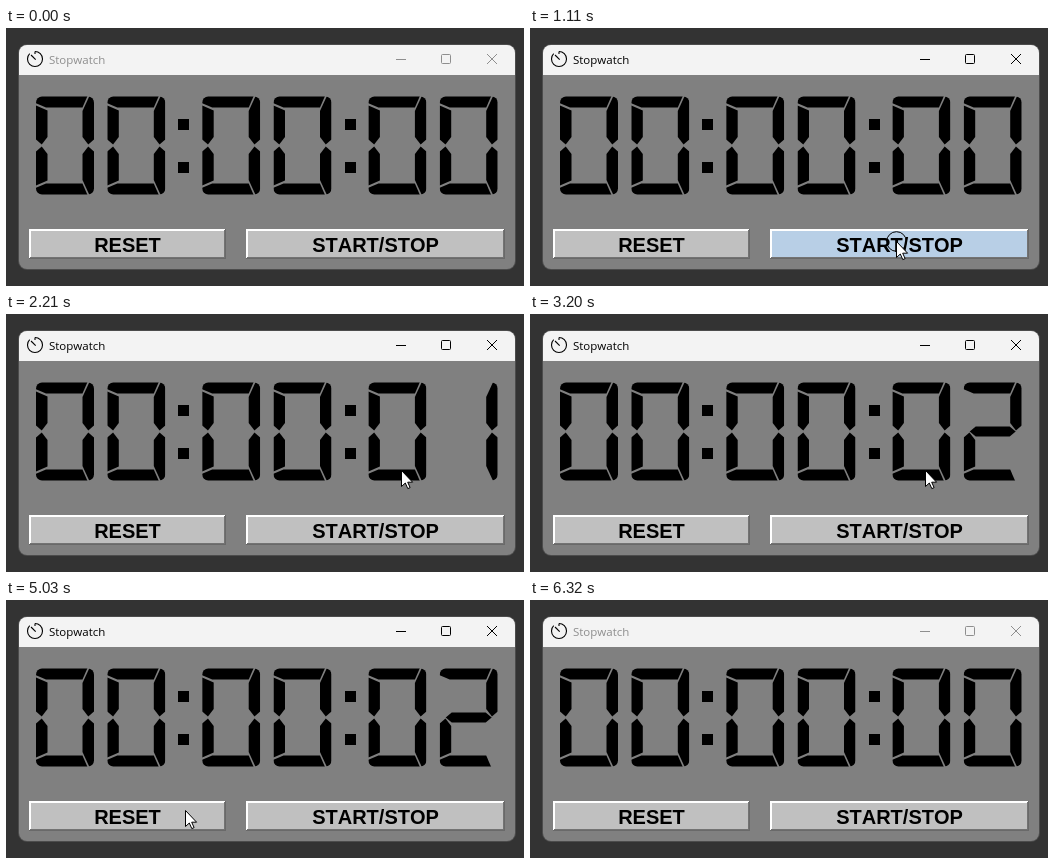
An HTML page with a canvas for the animation above (6.34 s loop, 518x258 px).

```html
<!DOCTYPE html>
<html lang="en">
<head>
<meta charset="utf-8">
<title>Stopwatch</title>
<style>
  html, body { margin: 0; width: 100%; height: 100%; overflow: hidden; background: #333; }
  canvas { display: block; }
</style>
</head>
<body>
<canvas id="stage" width="518" height="258"></canvas>
<script>
const ctx = document.getElementById('stage').getContext('2d');
const LOOP = 6340;
const BODY = '#808080';

// Digit cell and bar thickness
const W = 58, H = 99, BAR = 11.5;

// Upper vertical bar, its slanted top given at the outer and inner side
const upright = (outer, inner, topOuter, topInner) => [
  outer, topOuter, outer, 43.5, (outer + inner) / 2, 48.5, inner, 41, inner, topInner
];
const flip = points => points.map((v, i) => i % 2 ? H - v : v);
const a = [0, 0, 51.5, 0, 46.5, BAR, 10, BAR, 0, 7.2];
const b = upright(W, W - BAR, -10, 15);
const f = upright(0, BAR, 9.5, 14.5);
const g = [6, H / 2, 12, 44.5, 46, 44.5];
g.push(...g.map((v, i) => (i % 2 ? H : W) - v));
const SEGMENTS = { a, b, f, g, c: flip(b), d: flip(a), e: flip(f) };
const DIGITS = ['abcdef', 'bc', 'abged'];

const ARROW = [.5, .5, .5, 16.5, 4.3, 13, 6.8, 18.6, 9.1, 17.6, 6.7, 12.2, 11.6, 12.2];
const HALF = [.5, 5.5, 4.5, .7, 8.5, 5.5, 5.5, 5.5, 5.5, 17.5];
const RESIZE = HALF.concat(HALF.map((v, i) => (i % 2 ? 23 : 9) - v));

// The pointer moves in steps of STEP ms; key points are step, x, y
const STEP = 140.25, FIRST_STEP = 400;
const PATH = [
  [0, 357, 230], [1, 365, 223], [3, 366, 213], [6, 366, 213], [9, 386, 156],
  [12, 395, 156], [21, 395, 156], [25, 371, 208], [28, 368, 206], [29, 322, 189],
  [31, 197, 201], [33, 179, 210], [36, 181, 209], [39, 442, 231]
];

const within = (t, from, to) => t >= from && t < to;
const smooth = p => p * p * (3 - 2 * p);

function pointerAt(t) {
  const n = Math.floor((t - FIRST_STEP) / STEP);
  const i = PATH.findIndex(key => key[0] > n);
  if (i < 0) return PATH.at(-1).slice(1);
  const [n0, ...from] = PATH[i - 1], [n1, ...to] = PATH[i];
  const p = smooth((n - n0) / (n1 - n0));
  return from.map((v, k) => Math.round(v + (to[k] - v) * p));
}

function polygon(points) {
  ctx.beginPath();
  for (let i = 0; i < points.length; i += 2) ctx.lineTo(points[i], points[i + 1]);
  ctx.closePath();
}

function line(x1, y1, x2, y2) {
  ctx.beginPath();
  ctx.moveTo(x1, y1);
  ctx.lineTo(x2, y2);
  ctx.stroke();
}

function circle(x, y, r, from = 0, to = Math.PI * 2) {
  ctx.beginPath();
  ctx.arc(x, y, r, from, to);
  ctx.stroke();
}

function rect(color, x, y, w, h) {
  ctx.fillStyle = color;
  ctx.fillRect(x, y, w, h);
}

function panel(color, x, y, w, h, r) {
  ctx.fillStyle = color;
  ctx.beginPath();
  ctx.roundRect(x, y, w, h, r);
  ctx.fill();
}

function drawIcon() {
  ctx.strokeStyle = '#000';
  ctx.lineWidth = 1.1;
  circle(29, 31, 7.5, -Math.PI / 2, Math.PI * 1.25);
  line(29, 23.5, 29, 26);
  line(25, 27, 29.7, 31.7);
}

function drawTitle(active) {
  const color = active ? '#000' : '#8e8e8e';
  drawIcon();
  ctx.fillStyle = color;
  ctx.font = '11.5px "Open Sans", "Noto Sans", sans-serif';
  ctx.textAlign = 'left';
  ctx.fillText('Stopwatch', 43, 36);
  ctx.strokeStyle = color;
  ctx.lineWidth = 1;
  line(390, 31.5, 400, 31.5);
  ctx.beginPath();
  ctx.roundRect(435.5, 26.5, 9, 9, 1);
  ctx.stroke();
  line(481, 26, 491, 36);
  line(491, 26, 481, 36);
}

function drawWindow(active) {
  rect('#333', 0, 0, 518, 258);
  panel('#4c4c4c', 12, 16, 498, 226, 9);
  panel(BODY, 13, 17, 496, 224, 8);
  panel('#f3f3f3', 13, 17, 496, 30, [8, 8, 0, 0]);
  drawTitle(active);
}

function drawButton(label, x, w, pressed) {
  const y = 201, h = 30;
  rect('#696969', x, y, w, h);
  rect('#fff', x, y, w - 1, h - 1);
  rect('#737373', x + 1, y + 1, w - 2, h - 2);
  rect('#fff', x + 1, y + 1, w - 3, h - 3);
  rect(pressed ? '#b8cfe6' : '#c0c0c0', x + 2, y + 2, w - 4, h - 4);
  ctx.fillStyle = '#000';
  ctx.font = 'bold 20px "Liberation Sans", Arial, sans-serif';
  ctx.textAlign = 'center';
  ctx.fillText(label, x + w / 2, 223.5);
}

function drawDigit(value, x) {
  ctx.save();
  ctx.translate(x, 68);
  ctx.beginPath();
  ctx.roundRect(0, .5, W, H - 1, 6);
  ctx.clip();
  for (const name of DIGITS[value]) {
    polygon(SEGMENTS[name]);
    ctx.fill();
  }
  ctx.restore();
}

function drawClock(seconds) {
  ctx.fillStyle = '#000';
  for (let pair = 0; pair < 3; pair++) {
    const x = 30 + pair * 166.2;
    drawDigit(0, x);
    drawDigit(pair === 2 ? seconds : 0, x + 71.3);
    if (pair === 2) continue;
    for (const y of [91, 134]) ctx.fillRect(172 + pair * 167, y, 11, 11);
  }
}

function drawPointer(t) {
  if (!within(t, 410, 6020)) return;
  const [x, y] = pointerAt(t);
  const clicking = within(t, 1110, 1270) || within(t, 3920, 4050) || within(t, 5150, 5310);
  const onEdge = t < 570 || t >= 5870;
  ctx.save();
  ctx.translate(x, y);
  ctx.lineWidth = 1;
  ctx.strokeStyle = '#000';
  if (clicking) circle(.5, .5, 9.8);
  polygon(onEdge ? RESIZE : ARROW);
  ctx.fillStyle = '#fff';
  ctx.fill();
  ctx.stroke();
  ctx.restore();
}

function draw(t) {
  const seconds = within(t, 2210, 3200) ? 1 : within(t, 3200, 5310) ? 2 : 0;
  drawWindow(within(t, 1110, 6320));
  drawClock(seconds);
  drawButton('RESET', 23, 197, within(t, 5150, 5310));
  drawButton('START/STOP', 240, 259, within(t, 1110, 1270));
  drawPointer(t);
}

ctx.fontKerning = 'none';
const start = performance.now();
function tick() {
  draw((performance.now() - start) % LOOP);
  requestAnimationFrame(tick);
}
tick();
</script>
</body>
</html>
```
